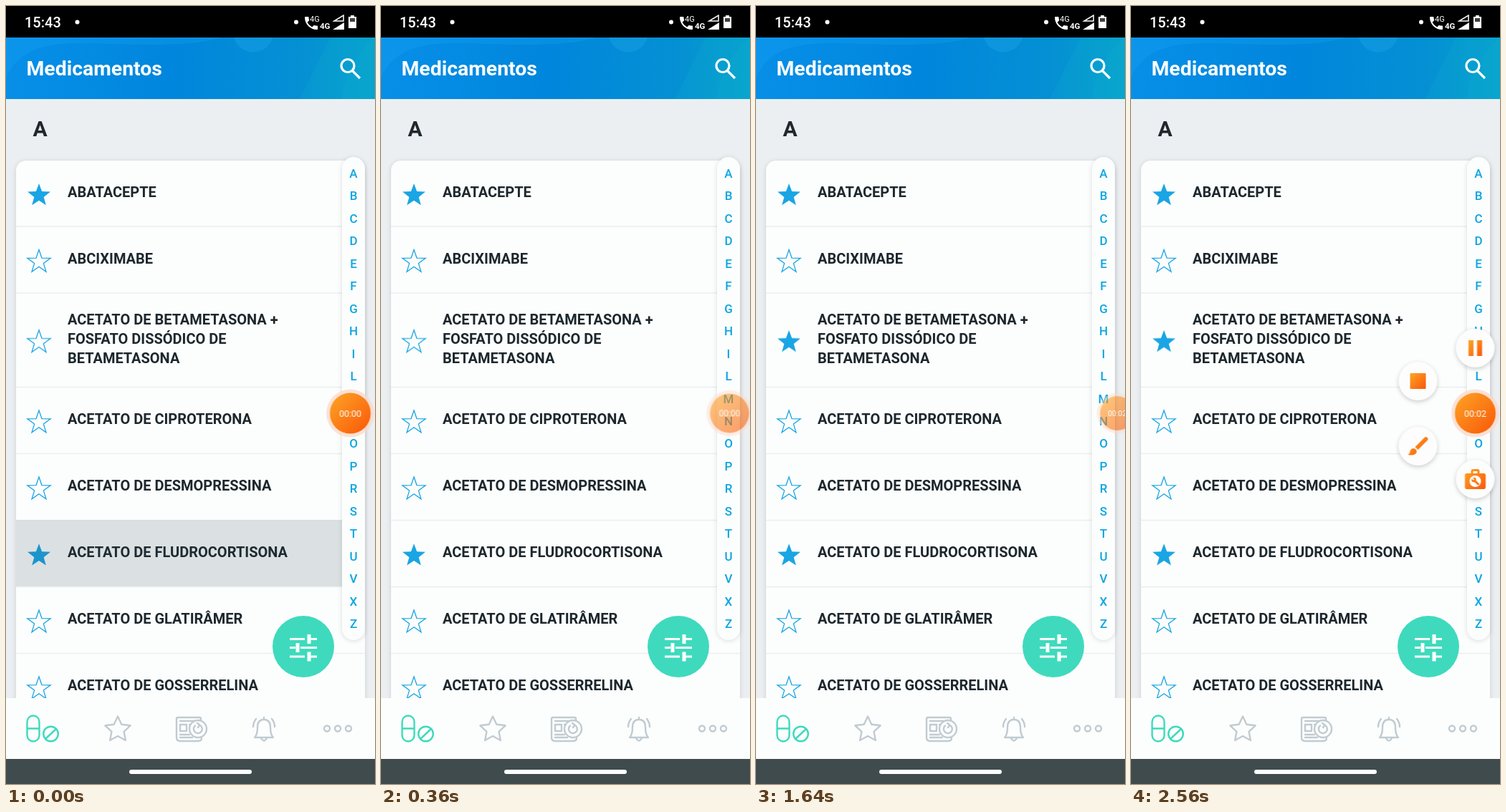
Write an HTML page that moves like this. It is 515 by 1087 pixels and loops after 2760 ms.

```html
<!DOCTYPE html>
<html lang="pt">
<head>
<meta charset="utf-8">
<title>Medicamentos</title>
<style>
html, body { margin: 0; width: 100%; height: 100%; overflow: hidden; background: #eceff1; }
svg { display: block; width: 100vw; height: 100vh; font-family: Roboto, sans-serif; }
.name { font-size: 20px; font-weight: 700; fill: #1d272d; }
.index { font-size: 17px; font-weight: 500; fill: #0ba5e1; text-anchor: middle; }
.line { fill: none; stroke-width: 2.4; stroke-linecap: round; stroke-linejoin: round; }
.soft { filter: drop-shadow(0 1px 3px #0002); }

/* One loop, 2760 ms, shared by every part */
.press, .bubble, .item, .step { animation: 2760ms linear infinite; }
.press { fill: #28404c; opacity: 0; }
.press.first { animation-name: release; }
.press.second { animation-name: tap; }
.bubble { animation-name: dock; }
.item { animation-name: pop; filter: drop-shadow(0 2px 3px #0003); }
.step { animation-timing-function: step-end; }
.starOff { animation-name: starOff; }
.starOn { animation-name: starOn; }
.sec0 { animation-name: sec0; }
.sec1 { animation-name: sec1; }
.sec2 { animation-name: sec2; }

@keyframes release { 0%, 2.9% { opacity: .15 } 10.5%, 100% { opacity: 0 } }
@keyframes tap {
  0%, 24.64% { opacity: 0 }
  28.5%, 32% { opacity: .15 }
  40.58%, 100% { opacity: 0 }
}
@keyframes starOff { 0% { opacity: 1 } 31.88%, 100% { opacity: 0 } }
@keyframes starOn { 0% { opacity: 0 } 31.88%, 100% { opacity: 1 } }
@keyframes sec0 { 0% { opacity: 1 } 23.19%, 100% { opacity: 0 } }
@keyframes sec1 { 0% { opacity: 0 } 23.19% { opacity: 1 } 59.42%, 100% { opacity: 0 } }
@keyframes sec2 { 0% { opacity: 0 } 59.42%, 100% { opacity: 1 } }
@keyframes dock {
  0%, 8.7% { transform: none; opacity: 1; animation-timing-function: cubic-bezier(.37, 0, .63, 1) }
  11.6% { opacity: .6 }
  21.74%, 79.71% { transform: translate(23.5px, 0) scale(.84); opacity: .6; animation-timing-function: ease-out }
  83.5%, 100% { transform: none; opacity: 1 }
}
@keyframes pop {
  0%, 81.2% { transform: scale(.3); opacity: 0; animation-timing-function: ease-out }
  84% { opacity: 1 }
  92%, 100% { transform: translate(var(--x), var(--y)); opacity: 1 }
}
</style>
</head>
<body>
<svg viewBox="0 0 515 1087" preserveAspectRatio="none">
  <defs>
    <linearGradient id="sky">
      <stop offset="0" stop-color="#078fe8"/><stop offset=".45" stop-color="#0086dc"/>
      <stop offset=".8" stop-color="#0590d4"/><stop offset="1" stop-color="#079fcd"/>
    </linearGradient>
    <linearGradient id="orange" x2="1" y2="1">
      <stop offset=".1" stop-color="#fd9d22"/><stop offset=".9" stop-color="#fa5f0c"/>
    </linearGradient>
  </defs>

  <rect width="515" height="1087" fill="#eceff1"/>

  <!-- Header -->
  <rect y="44" width="515" height="86" fill="url(#sky)"/>
  <path d="M0 100C18 62 50 52 105 52S250 60 300 44H0Z" fill="#19a4f2" opacity=".3"/>
  <path d="M410 130L453 44H515V130Z" fill="#0bb0cb" opacity=".2"/>
  <path d="M468 130Q476 78 515 44V130Z" fill="#0bb0cb" opacity=".18"/>
  <path d="M318 44A28 28 0 0 0 372 44Z" fill="#35b4f0" opacity=".22"/>
  <text x="28.5" y="97" font-size="28.4" font-weight="700" fill="#fcfeff">Medicamentos</text>
  <g fill="none" stroke="#fcfeff" stroke-width="3.2"><circle cx="477" cy="83.5" r="9"/><path d="M483 90L494 101"/></g>

  <!-- Status bar -->
  <rect width="515" height="44"/>
  <g fill="#fff">
    <text x="26" y="30" font-size="20" font-weight="500">15:43</text>
    <circle cx="99.5" cy="22.5" r="3"/><circle cx="405" cy="22.5" r="3"/>
    <path transform="translate(414 12)" d="M6.6 10.8c1.4 2.8 3.8 5.1 6.6 6.6l2.2-2.2c.3-.3.7-.4 1-.2 1.100.4 2.300.6 3.600.6.6 0 1 .4 1 1V20c0 .6-.4 1-1 1C10.600 21 3 13.400 3 4c0-.6.400-1 1-1h3.500c.6 0 1 .4 1 1 0 1.200.2 2.400.6 3.600.1.4 0 .7-.3 1z"/>
    <text x="424" y="22" font-size="11">4G</text>
    <text x="438" y="32" font-size="11.500" font-weight="700">4G</text>
    <path d="M456 33L472 23V33Z"/>
    <path d="M458 21L471 13V21Z" fill="none" stroke="#fff" stroke-width="1.500"/>
    <path d="M481 13H486V15H489V31H478V15H481Z"/>
  </g>
  <rect x="480" y="17" width="7" height="5" opacity=".75"/>

  <!-- List -->
  <text x="37.500" y="182" font-size="30" font-weight="700" fill="#20282d">A</text>
  <rect class="soft" x="14" y="216" width="487" height="800" rx="14" fill="#fcfefd"/>
  <g id="rows"></g>
  <rect class="soft" x="469" y="211" width="32" height="675" rx="16" fill="#fcfefd"/>
  <g id="letters"></g>

  <!-- Filter button -->
  <circle cx="415" cy="895" r="43" fill="#3fdabd"/>
  <g fill="none" stroke="#fff" stroke-width="2.800">
    <path d="M396 884.500H417M424 884.500H434M396 896.500H404M411 896.500H434M396 909H417M424 909H434"/>
    <path d="M423 878V891M407 890V903M423 902.500V915.500" stroke-width="5"/>
  </g>

  <!-- Tab bar -->
  <rect y="967" width="515" height="86" fill="#fcfefd"/>
  <rect y="1052" width="515" height="35" fill="#3f4b4d"/>
  <rect x="172" y="1067" width="171" height="6" rx="3" fill="#fff"/>
  <g class="line" stroke="#3fdabd">
    <rect x="29.500" y="991.500" width="17" height="36" rx="8.500"/>
    <path d="M30 1009.500H46M55 1024L70 1010"/><circle cx="62.500" cy="1017" r="10.300"/>
  </g>
  <g class="line" stroke="#c1cbd1">
    <path id="tabStar" transform="translate(156 1011)"/>
    <path d="M272 998V996Q272 994 270 994H240Q238 994 238 996V1022Q238 1027 243 1027H268Q273 1027 273 1023M243 999H266M243 1004H252V1013H243ZM243 1018H256M243 1022H260M256 1004H258"/>
    <circle cx="268" cy="1010" r="12" fill="#fcfefd"/>
    <path d="M264 1005.500A6 6 0 1 0 270 1004.500M267 1002L270.500 1004.500L268 1008"/>
    <path d="M347 1022Q351 1018 351 1008Q351 997 360 997T369 1008Q369 1018 373 1022ZM360 997V994M356 1023Q360 1030 364 1023M349 996Q345 1001 345 1007M371 996Q375 1001 375 1007"/>
    <circle cx="448" cy="1009.500" r="4"/><circle cx="463" cy="1009.500" r="4"/><circle cx="478" cy="1009.500" r="4"/>
  </g>

  <!-- Recorder bubble and its menu -->
  <g transform="translate(480.500 569)">
    <g class="item" style="--x:0px;--y:-91px">
      <circle r="27" fill="#fdfdfd"/><path d="M-9.500-11H-2.500V11H-9.500ZM2.500-11H9.500V11H2.500Z" fill="url(#orange)"/>
    </g>
    <g class="item" style="--x:-80px;--y:-45px">
      <circle r="27" fill="#fdfdfd"/><rect x="-11" y="-11" width="22" height="22" rx="1" fill="url(#orange)"/>
    </g>
    <g class="item" style="--x:-80px;--y:46px">
      <circle r="27" fill="#fdfdfd"/>
      <path d="M-4 1L9-12Q11-14 13-12T13-8L0 5ZM-6 3Q-1 4-2 9Q-5 14-14 12Q-11 10-11 7Q-10 3-6 3Z" fill="url(#orange)"/>
    </g>
    <g class="item" style="--x:0px;--y:92px">
      <circle r="27" fill="#fdfdfd"/>
      <path d="M-12-8H-6V-11Q-6-14-3-14H3Q6-14 6-11V-8H12Q14.500-8 14.500-5.500V11Q14.500 14 12 14H-12Q-14.500 14-14.500 11V-5.500Q-14.500-8-12-8ZM-3-8H3V-11H-3Z" fill="url(#orange)" fill-rule="evenodd"/>
      <circle cy="3" r="8" fill="#fff"/>
      <path d="M-1 2L4 7" stroke="#fb7612" stroke-width="3" stroke-linecap="round"/>
      <circle cx="-2" cy="1" r="3.200" fill="#fb7612"/><path d="M-5-2L-2 1" stroke="#fff" stroke-width="2"/>
    </g>
    <g class="bubble">
      <circle r="33.500" fill="#fbd9c8" opacity=".75"/>
      <circle r="28.500" fill="url(#orange)"/>
      <g font-size="12.500" fill="#fff" text-anchor="middle">
        <text class="step sec0" y="4.800">00:00</text>
        <text class="step sec1" y="4.800">00:01</text>
        <text class="step sec2" y="4.800">00:02</text>
      </g>
    </g>
  </g>
</svg>
<script>
const blue = '#1aa5e4';
const byId = id => document.getElementById(id);

function starPath(outer, inner) {
  const points = Array.from({ length: 10 }, (_, i) => {
    const radius = i % 2 ? inner : outer, angle = i * Math.PI / 5;
    return `${(radius * Math.sin(angle)).toFixed(2)} ${(-radius * Math.cos(angle)).toFixed(2)}`;
  });
  return `M${points.join('L')}Z`;
}

const star = (y, filled, cls = '') => filled
  ? `<path class="${cls}" transform="translate(46 ${y})" d="${starPath(16.8, 7)}" fill="${blue}"/>`
  : `<path class="${cls}" transform="translate(46 ${y})" d="${starPath(17, 6.7)}" fill="none" stroke="${blue}" stroke-width="1.3"/>`;

// Each row: bottom edge, lines of its name, star state
const rows = [
  [308, ['ABATACEPTE'], 'on'],
  [401, ['ABCIXIMABE'], 'off'],
  [532.5, ['ACETATO DE BETAMETASONA +', 'FOSFATO DISSÓDICO DE', 'BETAMETASONA'], 'tapped'],
  [625.5, ['ACETATO DE CIPROTERONA'], 'off'],
  [718.5, ['ACETATO DE DESMOPRESSINA'], 'off'],
  [811.5, ['ACETATO DE FLUDROCORTISONA'], 'on', 'first'],
  [904.5, ['ACETATO DE GLATIRÂMER'], 'off'],
  [997.5, ['ACETATO DE GOSSERRELINA'], 'off']
];

let top_ = 215.5;
byId('rows').innerHTML = rows.map(([bottom, lines, state, press]) => {
  const middle = (top_ + bottom) / 2;
  const firstLine = middle + 5.2 - (lines.length - 1) * 13.6;
  const names = lines.map((line, i) =>
    `<text class="name" x="86" y="${firstLine + i * 27.2}">${line}</text>`).join('');
  const starY = middle + 3;
  const stars = state === 'tapped'
    ? star(starY, false, 'step starOff') + star(starY, true, 'step starOn')
    : star(starY, state === 'on');
  const cls = state === 'tapped' ? 'second' : press;
  const overlay = cls
    ? `<rect class="press ${cls}" x="14" y="${top_}" width="487" height="${bottom - top_}"/>` : '';
  top_ = bottom;
  return `${names}${stars}${overlay}<path d="M14 ${bottom}H501" stroke="#e9eef0" stroke-width="1.3"/>`;
}).join('');

byId('letters').innerHTML = [...'ABCDEFGHILMNOPRSTUVXZ'].map((letter, i) =>
  `<text class="index" x="485" y="${240 + i * 31.45}">${letter}</text>`).join('');

byId('tabStar').setAttribute('d', starPath(18.5, 9));
</script>
</body>
</html>
```
